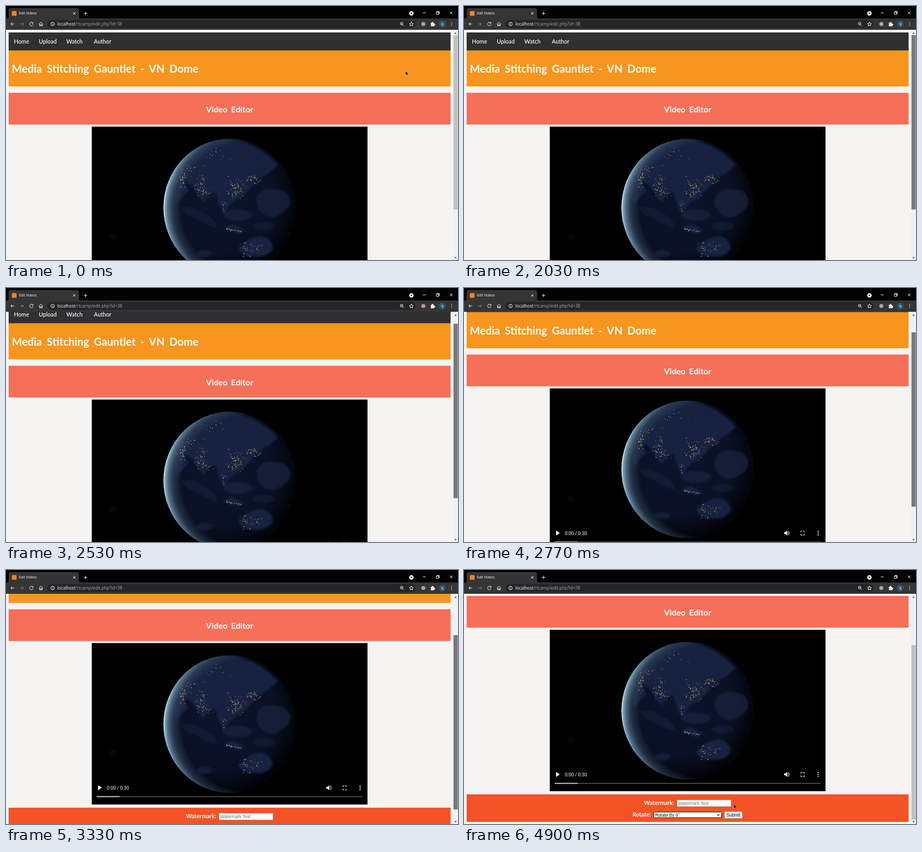
Animation, 854 px wide and 480 px high, one loop 4.93 s. Source, as an HTML page:

```html
<!DOCTYPE html>
<html lang="en">
<head>
<meta charset="utf-8">
<title>Edit Videos</title>
<style>
  html, body { margin: 0; width: 100%; height: 100%; overflow: hidden; background: #f5f4f3; }
  svg { display: block; width: 854px; height: 480px; }
  text { fill: #fff; }
  .ui { font-family: "Open Sans", sans-serif; }
  .page-text { font-family: Lato, "Open Sans", sans-serif; }
  .bold { font-weight: 700; }
  .field { font: 8.3px "Liberation Sans", Arial, sans-serif; }
  .line { fill: none; stroke: #f1f1f1; stroke-width: 1; }

  #page, #thumb, #cursor { animation: 4930ms linear infinite; }
  #page { animation-name: scroll; }
  #thumb { animation-name: drag, press; }
  #cursor { animation-name: move, hide; }

  @keyframes scroll {
    0%, 44.6% { transform: translateY(0); }
    51.3% { transform: translateY(-17px); }
    59.4% { transform: translateY(-52px); }
    73%, 100% { transform: translateY(-115px); }
  }
  @keyframes drag {
    0%, 44.6% { transform: translateY(0); }
    51.3% { transform: translateY(12.5px); }
    59.4% { transform: translateY(39.4px); }
    73%, 100% { transform: translateY(87px); }
  }
  @keyframes press {
    0%, 33.4% { fill: #c1c1c1; }
    33.41%, 77.4% { fill: #787878; }
    77.41%, 100% { fill: #c1c1c1; }
  }
  @keyframes move {
    0% { transform: translate(755px, 123px); }
    26.4% { transform: translate(786px, 116px); }
    33.4% { transform: translate(848px, 108px); }
    77.4% { transform: translate(848px, 435px); }
    87% { transform: translate(645px, 452px); }
    97%, 100% { transform: translate(510px, 443px); }
  }
  @keyframes hide {
    0%, 33.4% { visibility: visible; }
    33.41%, 77.4% { visibility: hidden; }
    77.41%, 100% { visibility: visible; }
  }
</style>
</head>
<body>
<svg viewBox="0 0 854 480">
  <defs>
    <radialGradient id="rim" gradientUnits="userSpaceOnUse" cx="457" cy="383" r="160">
      <stop offset=".78" stop-color="#33465c" stop-opacity="0"/>
      <stop offset=".88" stop-color="#33465c" stop-opacity=".6"/>
      <stop offset=".95" stop-color="#56728a"/>
      <stop offset=".98" stop-color="#84abc0"/>
      <stop offset=".995" stop-color="#e2f8ff"/>
    </radialGradient>
    <radialGradient id="globe" gradientUnits="userSpaceOnUse" cx="405" cy="365" r="145">
      <stop offset="0" stop-color="#0c142b"/>
      <stop offset=".7" stop-color="#0a1125"/>
      <stop offset="1" stop-color="#02040a"/>
    </radialGradient>
    <filter id="soft" x="-20%" y="-20%" width="140%" height="140%"><feGaussianBlur stdDeviation="2"/></filter>
    <clipPath id="disc"><ellipse cx="422.500" cy="381" rx="125" ry="130"/></clipPath>
  </defs>

  <rect width="854" height="480" fill="#f5f4f3"/>

  <g id="page">
    <rect x="5" y="50" width="835" height="34" fill="#303030"/>
    <g class="page-text" font-size="10.7" font-weight="500">
      <text x="15" y="71">Home</text>
      <text x="62" y="71">Upload</text>
      <text x="114" y="71">Watch</text>
      <text x="166" y="71">Author</text>
    </g>
    <rect x="5" y="84" width="835" height="68" fill="#f7951f"/>
    <text class="page-text bold" x="11" y="126" font-size="20.4" word-spacing="4">Media Stitching Gauntlet - VN Dome</text>
    <rect x="5" y="164" width="835" height="60" fill="#f66f58"/>
    <text class="page-text bold" x="422.5" y="201" font-size="15.6" word-spacing="3" text-anchor="middle">Video Editor</text>

    <rect x="162" y="228" width="521" height="305" fill="#000"/>
    <circle cx="202" cy="436" r="7" fill="#06070b"/>
    <g clip-path="url(#disc)">
      <rect x="290" y="245" width="265" height="270" fill="url(#globe)"/>
      <g fill="#18223f" filter="url(#soft)">
        <path d="M312 318Q340 262 405 250Q470 252 514 300Q492 322 474 326Q462 350 440 364Q420 372 413 396Q402 380 396 352Q382 352 374 372Q360 356 350 338Z"/>
        <path d="M318 325Q338 330 345 350Q330 362 322 376Q312 350 318 325Z"/>
        <path d="M438 458Q456 436 484 435Q505 442 504 460Q488 478 470 473Q450 478 438 458Z"/>
        <path d="M474 362Q484 342 506 346Q526 344 536 362Q542 380 520 392Q506 404 490 396Q470 384 474 362Z" opacity=".75"/>
        <path d="M410 420L428 412L452 424L440 431Z"/>
        <path d="M330 382Q352 374 374 392Q396 400 400 420Q372 414 358 400Q342 400 330 382Z" opacity=".45"/>
        <ellipse cx="375" cy="468" rx="15" ry="7" opacity=".7"/>
        <ellipse cx="438" cy="395" rx="28" ry="11" opacity=".75"/>
        <ellipse cx="488" cy="416" rx="22" ry="8" opacity=".4"/>
      </g>
      <rect x="290" y="245" width="265" height="270" fill="url(#rim)"/>
      <path id="dim" fill="#86704f"/>
      <path id="bright" fill="#e4bd85"/>
    </g>

    <path d="M174 496.500V506L181 501.200Z" fill="#fff"/>
    <text x="190.500" y="505" font-size="8.800" style="font-family:Roboto,sans-serif">0:00 / 0:30</text>
    <path d="M605 499.500h2.500l3-3v9.500l-3-3h-2.500z" fill="#fff"/>
    <path class="line" d="M611.500 499q2 2.200 0 4.500M612 496.500q5.500 4.700 0 9.500"/>
    <path class="line" stroke-width="1.300" d="M636.500 500v-2.500h2.500M640.500 497.500h2.500v2.500M643 503v2.500h-2.500M639 505.500h-2.500v-2.500"/>
    <g fill="#fff"><circle cx="669" cy="498" r="1.100"/><circle cx="669" cy="501.500" r="1.100"/><circle cx="669" cy="505" r="1.100"/></g>
    <rect x="171" y="517.200" width="503" height="2" rx="1" fill="#4a4a4a"/>
    <rect x="171" y="517.200" width="44" height="2" rx="1" fill="#b8b8b8"/>

    <rect x="5" y="539" width="835" height="52" fill="#f35326"/>
    <g class="page-text bold" font-size="10.8" text-anchor="end">
      <text x="397" y="559">Watermark:</text>
      <text x="353" y="581">Rotate:</text>
    </g>
    <rect x="402.500" y="549.500" width="102" height="12.500" fill="#fff" stroke="#9a9a9a" stroke-width=".7"/>
    <text class="field" x="404.500" y="558.700" style="fill:#757575">Watermark Text</text>
    <rect x="358.500" y="572.500" width="128" height="10.500" rx="1" fill="#fff" stroke="#1a1a1a"/>
    <text class="field" x="361" y="580.800" style="fill:#111">Rotate By 0°</text>
    <path d="M478.500 576.800l2.200 2.200 2.200-2.200" fill="none" stroke="#111" stroke-width="1.200"/>
    <rect x="492" y="571.500" width="34" height="13" rx="1" fill="#efefef" stroke="#808080" stroke-width=".7"/>
    <text class="field" x="509" y="581" text-anchor="middle" style="fill:#111">Submit</text>
  </g>

  <rect x="844.500" y="45" width="9.500" height="435" fill="#f1f1f1"/>
  <rect id="thumb" x="845.500" y="55" width="8" height="329.500"/>
  <path d="M847 52.500l2.300-2.700 2.300 2.700zM847 474.500l2.300 2.700 2.300-2.700z" fill="#505050"/>

  <g class="ui">
    <rect width="854" height="24" fill="#030303"/>
    <path d="M2 24Q5 24 5 20V8Q5 4 9 4H134Q138 4 138 8V20Q138 24 141 24Z" fill="#353535"/>
    <rect y="23.500" width="854" height="21.500" fill="#353535"/>
    <rect x="11" y="9.500" width="9" height="9" rx="1.500" fill="#f0802c"/>
    <text x="24.500" y="16.400" font-size="6.500">Edit Videos</text>
    <path class="line" d="M126.800 11.800l4.400 4.400m0-4.400l-4.400 4.400M147 14h6.500M150.250 10.800v6.500"/>
    <circle cx="766" cy="14" r="4.200" fill="#f1f1f1"/>
    <path d="M763.800 12.800h4.400l-2.200 2.700z" fill="#111"/>
    <path class="line" stroke-width=".8" d="M787.500 13h5.500M813 11.500h4.500v4.500h-4.500zM814.200 11.500v-1.300h4.500v4.500h-1.200M838.500 10.500l5 5m0-5l-5 5"/>

    <rect x="78" y="26.500" width="696" height="15" rx="7.500" fill="#242527"/>
    <path class="line" d="M15.500 34h-6.500m3-3l-3 3 3 3"/>
    <path class="line" opacity=".4" d="M26.500 34h6.500m-3-3l3 3-3 3"/>
    <path class="line" d="M50.600 32a3.300 3.300 0 1 0 .6 2.800M51 30.500v2.300h-2.300"/>
    <path class="line" d="M62.300 34.200l3.700-3.500 3.700 3.500M63.500 33.500v4h1.700v-2.300h1.600v2.300h1.700v-4"/>
    <circle class="line" cx="88" cy="34" r="3.300" stroke-width=".8"/>
    <path class="line" d="M88 33.500v2.300M88 31.800v.8"/>
    <text x="97" y="36.800" font-size="8.100">localhost<tspan fill="#a4a6aa">/rtcamp/edit.php?id=38</tspan></text>
    <circle class="line" cx="747.500" cy="33.300" r="2.500"/>
    <path class="line" d="M749.400 35.200l2.300 2.300M746.300 33.300h2.400"/>
    <path class="line" stroke-width=".9" d="M766 30.300l1.100 2.500 2.700.3-2 1.800.6 2.700-2.400-1.400-2.400 1.400.6-2.700-2-1.800 2.700-.3z"/>
    <circle cx="788.500" cy="34" r="3.800" fill="#b5a197"/>
    <path d="M802.500 32h2a1.400 1.400 0 1 1 2.600 0h2v2a1.400 1.400 0 1 1 0 2.600v1.600h-6.600v-2a1.400 1.400 0 0 0 0-2.400z" fill="#f1f1f1"/>
    <circle cx="824.300" cy="34" r="6.300" fill="#2a5a6c"/>
    <text x="824.300" y="36.300" font-size="7" text-anchor="middle">q</text>
    <g fill="#f1f1f1"><circle cx="842" cy="31" r=".8"/><circle cx="842" cy="34" r=".8"/><circle cx="842" cy="37" r=".8"/></g>
  </g>

  <path id="cursor" d="M0 0V7.300L1.700 5.800 2.900 8.500 4.100 8 2.900 5.300H5.200Z" fill="#050505" stroke="#fff" stroke-width=".3"/>
</svg>
<script>
  // City lights: centre x, y, spread x, y, count
  const cities = [
    [332, 328, 6, 20, 45],
    [352, 308, 24, 12, 22],
    [368, 340, 11, 20, 60],
    [380, 353, 9, 10, 18],
    [436, 344, 17, 20, 85],
    [468, 327, 13, 9, 42],
    [411, 377, 5, 14, 14],
    [462, 458, 20, 13, 42],
    [395, 280, 30, 12, 16]
  ];
  let seed = 11;
  const rand = () => (seed = seed * 16807 % 2147483647) / 2147483647;
  const spread = () => rand() + rand() + rand() - 1.5;
  const paths = { dim: "", bright: "" };

  function addLight(x, y) {
    const size = (0.6 + rand() * 0.9).toFixed(1);
    const tone = rand() < 0.5 ? "dim" : "bright";
    paths[tone] += `M${x.toFixed(1)} ${y.toFixed(1)}h${size}v${size}h-${size}z`;
  }

  for (const [x, y, w, h, count] of cities)
    for (let i = 0; i < count; i++) addLight(x + spread() * w, y + spread() * h);
  // Island chain
  for (let i = 0; i < 26; i++) {
    const k = rand();
    addLight(415 + k * 30, 420 + k * 6 + spread() * 2);
  }
  for (const id in paths) document.getElementById(id).setAttribute("d", paths[id]);
</script>
</body>
</html>
```
